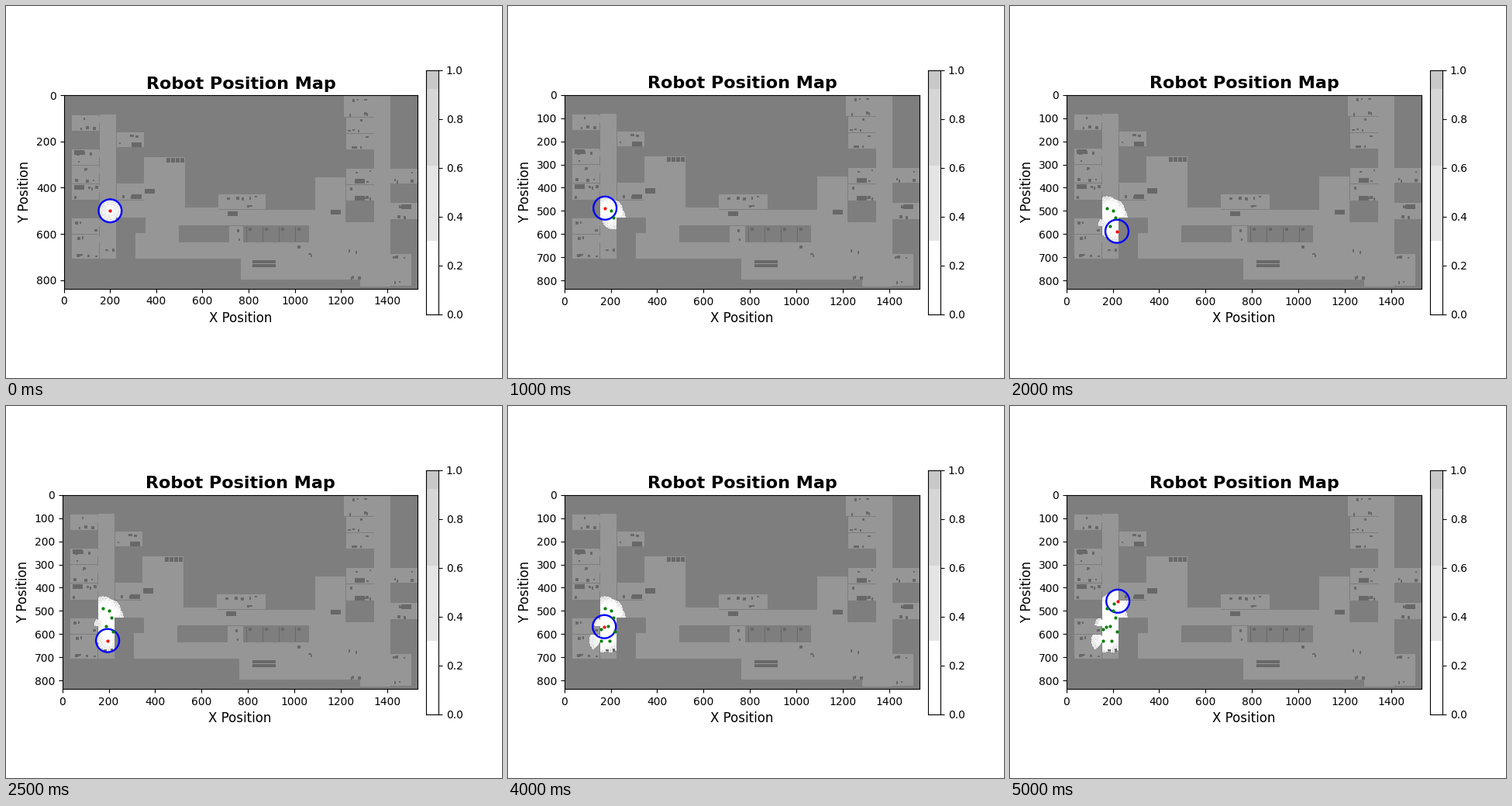
Write a matplotlib script that moves like this. It is 640 by 480 pixels and loops after 5500 ms.

```python
import numpy as np
import matplotlib.pyplot as plt
from matplotlib.animation import FuncAnimation
from matplotlib.patches import Circle
from matplotlib.ticker import MultipleLocator

W, H = 640, 480
MAP_W, MAP_H = 1533, 837      # map units
COLS, ROWS = 458, 250         # grid cells
X0, Y0 = 73, 115              # stage position of the first cell
CELL = COLS / MAP_W
RADIUS = 50                   # sensor range in map units
WALL, FLOOR, ITEM = 126, 150, 104

PATH = np.array([(200, 500), (212, 529), (175, 488), (188, 565), (218, 588),
                 (195, 628), (158, 628), (158, 579), (172, 568), (205, 470),
                 (222, 458)])

# Open halls: x, y, width, height on the stage
HALLS = [(119, 140, 21, 186), (140, 251, 38, 22), (176, 195, 53, 65),
         (178, 260, 94, 23), (178, 263, 259, 20), (178, 260, 43, 66),
         (165, 293, 56, 33), (221, 305, 177, 21), (301, 326, 155, 27),
         (390, 263, 47, 90), (398, 221, 39, 42), (474, 116, 21, 246),
         (437, 279, 37, 74), (456, 353, 18, 9)]
# Stacks of rooms: x, width, then top and bottom of each room
ROOMS = [(83, 35, [(141, 161), (185, 205), (206, 229), (230, 250), (274, 294),
                   (295, 326)]),
         (141, 35, [(163, 182), (229, 250)]),
         (272, 62, [(243, 262)]),
         (286, 19, [(284, 305)]),
         (435, 42, [(116, 143)]),
         (438, 36, [(144, 164), (165, 185), (210, 230), (231, 251)]),
         (495, 36, [(210, 229), (254, 275)]),
         (495, 27, [(320, 361)])]
DESKS = [(86, 186), (86, 231), (160, 176), (160, 243), (177, 236), (284, 265),
         (418, 263), (449, 223), (449, 245), (509, 256)]


def paint(grid, shade, x, y, w, h):
    grid[y - Y0:y - Y0 + h, x - X0:x - X0 + w] = shade


def add_chairs(grid, rng, x, y, w, h):
    """Small chairs scattered along the upper and lower walls."""
    for _ in range(w * h // 150):
        top = y + 2 if rng.random() < 0.5 else y + h - 6
        left = x + rng.integers(2, w - 4)
        paint(grid, ITEM, left, top + rng.integers(0, 3), *rng.integers(2, 5, 2))


def build_floor(rng):
    grid = np.full((ROWS, COLS), float(WALL))
    for hall in HALLS:
        paint(grid, FLOOR, *hall)
    for x, w, spans in ROOMS:
        for top, bottom in spans:
            paint(grid, FLOOR, x, top, w, bottom - top)
            add_chairs(grid, rng, x, top, w, bottom - top)
            if x + w < 119:
                paint(grid, FLOOR, x + w, top + 2, 1, 8)   # door to the hall
    for x, y in DESKS:
        paint(grid, ITEM, x, y, 13, 6)
    for k in range(4):
        paint(grid, ITEM, 205 + 6 * k, 196, 5, 6)
        paint(grid, ITEM, 309 + 21 * k, 285, 1, 19)
        paint(grid, ITEM, 312 + 21 * k, 286, 4, 4)
    for y in (328, 333):
        paint(grid, ITEM, 317, y, 30, 4)
    add_chairs(grid, rng, 119, 310, 21, 16)
    add_chairs(grid, rng, 368, 306, 30, 19)
    add_chairs(grid, rng, 438, 312, 20, 41)
    return grid


def visible(floor, pos):
    """Relative distance of each cell that rays cast from pos can reach."""
    reach = RADIUS * CELL
    ang = np.linspace(0, 2 * np.pi, 260, endpoint=False)[:, None]
    dist = np.arange(0, reach, 0.4)[None, :]
    col = (pos[0] * CELL + dist * np.cos(ang)).astype(int)
    row = (pos[1] * CELL + dist * np.sin(ang)).astype(int)
    clear = np.cumprod(floor[row, col] == FLOOR, axis=1).astype(bool)
    far = np.broadcast_to(dist / reach, clear.shape)
    seen = np.full(floor.shape, np.inf)
    np.minimum.at(seen, (row[clear], col[clear]), far[clear])
    return seen


def build_maps():
    rng = np.random.default_rng(4)
    floor = build_floor(rng)
    doubt = np.ones_like(floor)
    maps = []
    for pos in PATH:
        seen = visible(floor, pos)
        hit = np.isfinite(seen)
        doubt[hit] *= 0.9 * seen[hit] * rng.random(hit.sum())
        maps.append(np.where(doubt < 1, 255 - 60 * doubt, floor))
    return maps


def stage_rect(left, top, right, bottom):
    return [left / W, 1 - bottom / H, (right - left) / W, (bottom - top) / H]


def map_rect(left, right=531.3, middle=240):
    half = (right - left) * MAP_H / MAP_W / 2
    return stage_rect(left, middle - half, right, middle + half)


maps = build_maps()
fig = plt.figure(figsize=(W / 100, H / 100), dpi=100, facecolor="white")
ax = fig.add_axes(map_rect(72.8))
image = ax.imshow(maps[0], cmap="gray", vmin=0, vmax=255, aspect="auto",
                  interpolation="nearest", extent=(0, MAP_W, MAP_H, 0))
ax.set_title("Robot Position Map", fontsize=16, fontweight="bold")
ax.set_xlabel("X Position", fontsize=12)
ax.set_ylabel("Y Position", fontsize=12)
ax.xaxis.set_major_locator(MultipleLocator(200))

ring = ax.add_patch(Circle(PATH[0], RADIUS, fill=False, ec="blue", lw=1.7, zorder=3))
dot = dict(marker="o", ls="", ms=3, mew=0)
trail, = ax.plot([], [], color="green", zorder=4, **dot)
robot, = ax.plot([], [], color="red", zorder=5, **dot)
ax.set_xlim(0, MAP_W)
ax.set_ylim(MAP_H, 0)

bar = fig.add_axes(stage_rect(542.4, 82.7, 558.2, 397.7))
levels = [0, 0.3, 0.61, 0.924, 1]
for low, high, shade in zip(levels, levels[1:], ("1.0", "0.898", "0.84", "0.785")):
    bar.axhspan(low, high, color=shade, lw=0)
bar.set_xlim(0, 1)
bar.set_ylim(0, 1)
bar.set_xticks([])
bar.yaxis.tick_right()
bar.yaxis.set_major_locator(MultipleLocator(0.2))


def update(i):
    # The layout widens once after the first step
    ax.set_position(map_rect(72.8 if i else 74.8))
    ax.yaxis.set_major_locator(MultipleLocator(100 if i else 200))
    image.set_data(maps[i])
    ring.center = PATH[i]
    trail.set_data(PATH[:i, 0], PATH[:i, 1])
    robot.set_data(PATH[i:i + 1, 0], PATH[i:i + 1, 1])
    return image, ring, trail, robot


anim = FuncAnimation(fig, update, frames=len(PATH), interval=500,
                     repeat=True, repeat_delay=0, blit=False)
plt.show()
```
